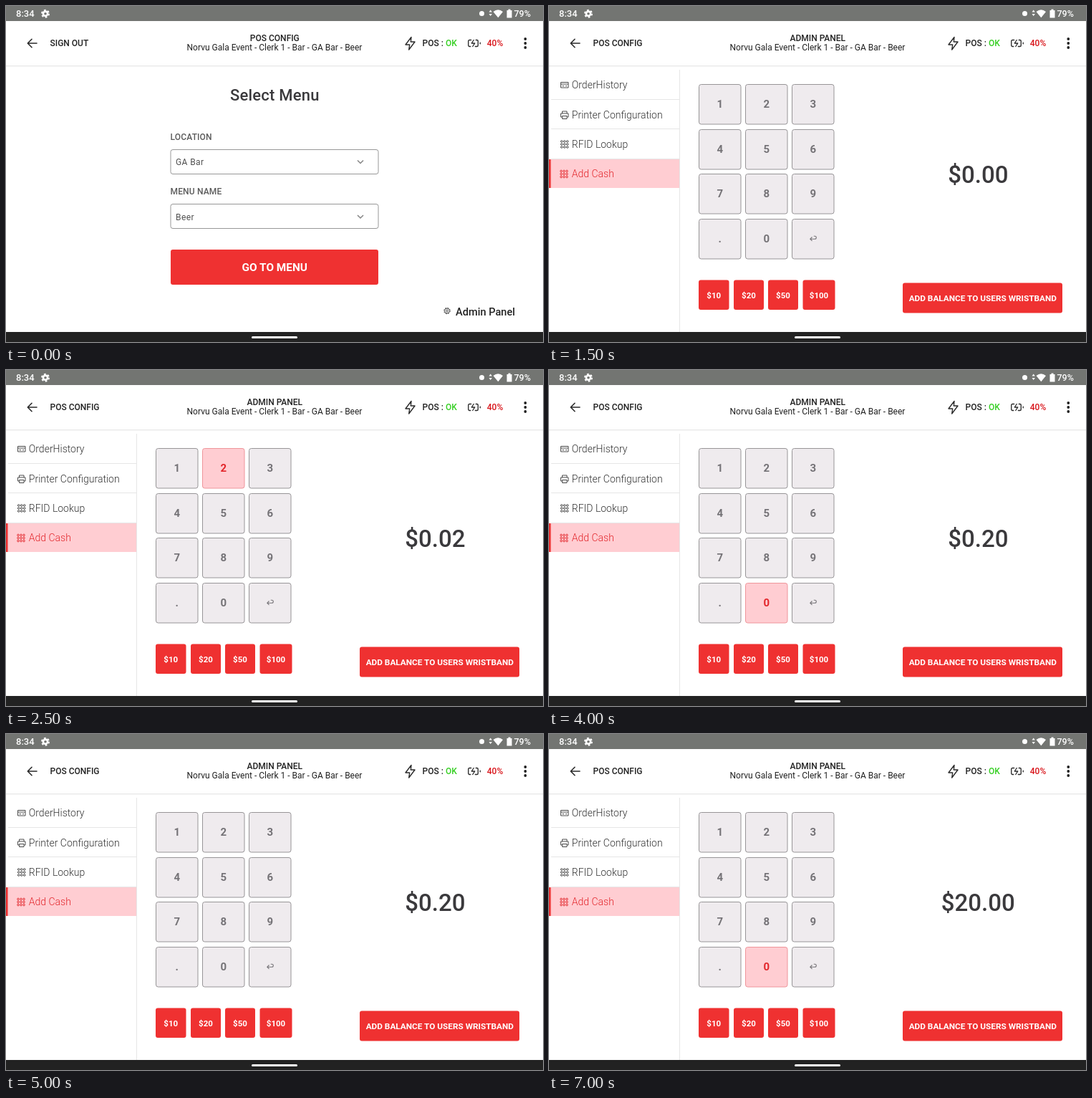
An HTML page for the animation above (8 s loop, 750x469 px).

```html
<!DOCTYPE html>
<html lang="en">
<head>
<meta charset="utf-8">
<title>Add cash</title>
<style>
html, body { margin: 0; width: 100%; height: 100%; overflow: hidden; background: #fff; }
svg { display: block; width: 100%; height: 100%; font-family: Roboto, sans-serif; font-size: 12px; fill: #222; }
text { white-space: pre; }
.m { font-weight: 500; }
.b { font-weight: 700; }
.mid { text-anchor: middle; }
.line { fill: none; stroke: #2a2a2a; stroke-width: 1.4; stroke-linecap: round; stroke-linejoin: round; }
.red { fill: #ef3131; }
.white { fill: #fff; }
.label { fill: #5b5b5b; letter-spacing: .15px; }
.field { fill: #fff; stroke: #979797; }
.value { fill: #505050; letter-spacing: .4px; }
.chev { fill: none; stroke: #858585; stroke-width: 1.5; }
.side { font-size: 14px; font-weight: 300; fill: #333; }
.small { fill: none; stroke: #4a4a4a; }
.rule { stroke: #e6e6e6; }
.key rect { fill: #efebee; stroke: #979597; }
.key text { font-size: 15px; font-weight: 700; fill: #757377; }
.key.down rect { fill: #ffcdd2; stroke: #ee959a; }
.key.down text { fill: #e3272c; }
.on, .on.side { fill: #e3272c; }
.small.on { fill: none; stroke: #e3272c; }
</style>
</head>
<body>
<svg viewBox="0 0 750 469">
  <rect width="750" height="469" fill="#fff"/>
  <rect width="750" height="21" fill="#737572"/>
  <g class="white">
    <text class="m" x="14" y="15.3" font-size="13">8:34</text>
    <text class="m" x="709.5" y="15.3" font-size="12.5">79%</text>
    <circle cx="55" cy="10.7" r="3.1" fill="none" stroke="#fff" stroke-width="2.6"/>
    <circle cx="55" cy="10.7" r="5" fill="none" stroke="#fff" stroke-width="2" stroke-dasharray="2.7 2.536"/>
    <circle cx="664.5" cy="10.5" r="3.5"/>
    <path d="M674.5 8.5l2.2-3 2.2 3zM674.5 11l2.2 3 2.2-3zM680.5 8Q687.3 2.5 694 8L687.3 16.3zM699.5 6h2v-1.5h3V6h2v10.5h-7z"/>
  </g>

  <path d="M0 83.5H750" stroke="#e8e8e8"/>
  <path d="M0 84.5H750" stroke="#f7f7f7"/>
  <path class="line" style="stroke-width:1.6" d="M43 52H30.5M36 46.3L30.3 52l5.7 5.7"/>
  <text class="m" id="back" x="61.5" y="55.7"></text>
  <text class="m mid" id="title" x="375.3" y="48.7"></text>
  <text class="mid" x="375" y="62.2">Norvu Gala Event - Clerk 1 - Bar - GA Bar - Beer</text>
  <path class="line" d="M566 43.5L558 54h5.7l-1 7L571 50h-5.7z"/>
  <text class="m" x="581.5" y="56.3">POS : <tspan fill="#35cf22">OK</tspan></text>
  <path class="line" style="stroke-width:1.8" transform="translate(645 43) scale(.75)" d="M5 18H3a2 2 0 0 1-2-2V8a2 2 0 0 1 2-2h3.2M15 6h2a2 2 0 0 1 2 2v8a2 2 0 0 1-2 2h-3.2M23 13v-2M11 6l-4 6h6l-4 6"/>
  <text class="m" x="671.8" y="56.3" fill="#d9161c">40%</text>
  <path d="M725.3 46v0M725.3 52v0M725.3 58v0" stroke="#222" stroke-width="3.8" stroke-linecap="round"/>

  <g id="menu">
    <text class="m mid" x="375.3" y="132" font-size="22" letter-spacing=".2" fill="#3a393c">Select Menu</text>
    <text class="m label" x="229.5" y="187">LOCATION</text>
    <rect class="field" x="230" y="200.5" width="290" height="34" rx="3"/>
    <text class="value" x="237" y="221.8">GA Bar</text>
    <path class="chev" d="M491 215.5l4 4 4-4"/>
    <text class="m label" x="229.5" y="263.2">MENU NAME</text>
    <rect class="field" x="230" y="276.5" width="290" height="34" rx="3"/>
    <text class="value" x="237" y="298.8">Beer</text>
    <path class="chev" d="M491 292l4 4 4-4"/>
    <rect class="red" x="230" y="340" width="290" height="49" rx="3"/>
    <text class="b mid white" x="375.3" y="370" font-size="15.4">GO TO MENU</text>
    <rect id="hover" x="599" y="410" width="134.5" height="33" fill="#dadada"/>
    <circle class="small" cx="616" cy="425.5" r="3.5"/>
    <circle class="small" cx="616" cy="425.5" r="4.3" stroke-dasharray="1.7 1.677"/>
    <circle class="small" cx="616" cy="425.5" r="1.4"/>
    <text class="m" x="628" y="432" font-size="14.6">Admin Panel</text>
  </g>

  <g id="panel">
    <path class="rule" d="M182.5 89V455M3 130.5H182M3 171.5H182M3 213.5H182"/>
    <rect y="214" width="182" height="40" fill="#ffcdd2"/>
    <rect class="red" y="214" width="2.5" height="40"/>
    <path class="small" d="M16.5 106.5h10.5v7.5H16.5zM16.5 109h10.5M18.5 111.7h2.5M23 111.7h2"/>
    <path class="small" d="M18.5 150v-3h6.5v3M18.5 155h-2v-5h10.5v5h-2M18.5 153.5h6.5v4h-6.5z"/>
    <text class="side" x="31.8" y="115.4">OrderHistory</text>
    <text class="side" x="31.8" y="156.8">Printer Configuration</text>
    <text class="side" x="31.8" y="197.8">RFID Lookup</text>
    <text class="side on" x="31.8" y="239.2">Add Cash</text>
    <text class="m mid" id="amount" x="599.3" y="246.8" font-size="33" fill="#3a393c"></text>
    <rect class="red" x="494" y="386.5" width="223" height="42" rx="3"/>
    <text class="b mid white" x="605.8" y="411.8" font-size="11.8">ADD BALANCE TO USERS WRISTBAND</text>
  </g>

  <rect y="455" width="750" height="14"/>
  <rect class="white" x="343" y="461" width="64" height="3" rx="1.5"/>
</svg>
<script>
const $ = id => document.getElementById(id);

function add(parent, tag, attrs, text = '') {
  const el = document.createElementNS('http://www.w3.org/2000/svg', tag);
  for (const name in attrs) el.setAttribute(name, attrs[name]);
  el.textContent = text;
  return parent.appendChild(el);
}

function dotGrid(x, y, cls) {
  for (let i = 0; i < 9; i++)
    add($('panel'), 'circle', { class: cls, cx: x + i % 3 * 4, cy: y + (i / 3 | 0) * 4, r: 1.3 });
}
dotGrid(17.7, 189, 'small');
dotGrid(17, 230.5, 'small on');

const keys = {};
[...'123456789.0', ''].forEach((label, i) => {
  const x = 209.5 + i % 3 * 65, y = 109.5 + Math.round((i / 3 | 0) * 62.6);
  const g = keys[label] = add($('panel'), 'g', { class: 'key' });
  add(g, 'rect', { x, y, width: 58.5, height: 55.5, rx: 3 });
  if (label) add(g, 'text', { class: 'mid', x: x + 29.2, y: y + 32.5 }, label);
  else add(g, 'path', {
    d: `M${x + 28} ${y + 25}l-2.7 2.7 2.7 2.7M${x + 25.5} ${y + 27.7}h6.3q2 0 2-2t-2-2h-1.5`,
    fill: 'none', stroke: '#757377', 'stroke-width': 1.1
  });
});

[['$10', 209, 42.5], ['$20', 258, 42], ['$50', 306, 42], ['$100', 354.5, 45]].forEach(([label, x, width]) => {
  add($('panel'), 'rect', { class: 'red', x, y: 382.5, width, height: 41.5, rx: 3 });
  add($('panel'), 'text', { class: 'b mid white', x: x + width / 2, y: 407.5, 'font-size': 11.5 }, label);
});

// Key presses: start, end, key
const presses = [[2500, 3500, '2'], [4000, 5000, '0'], [5500, 6500, '0'], [7000, 8000, '0']];

function draw(now) {
  const t = now % 8000, inPanel = t >= 1500;
  $('menu').style.display = inPanel ? 'none' : '';
  $('panel').style.display = inPanel ? '' : 'none';
  $('hover').style.display = t >= 500 ? '' : 'none';
  $('back').textContent = inPanel ? 'POS CONFIG' : 'SIGN OUT';
  $('title').textContent = inPanel ? 'ADMIN PANEL' : 'POS CONFIG';

  let cents = 0, held = null;
  for (const [start, end, key] of presses) {
    if (t >= start) cents = cents * 10 + +key;
    if (t >= start && t < end) held = key;
  }
  $('amount').textContent = '$' + (cents / 100).toFixed(2);
  for (const key in keys) keys[key].classList.toggle('down', key === held);
}

const begin = performance.now();
function tick() {
  draw(performance.now() - begin);
  requestAnimationFrame(tick);
}
tick();
</script>
</body>
</html>
```
